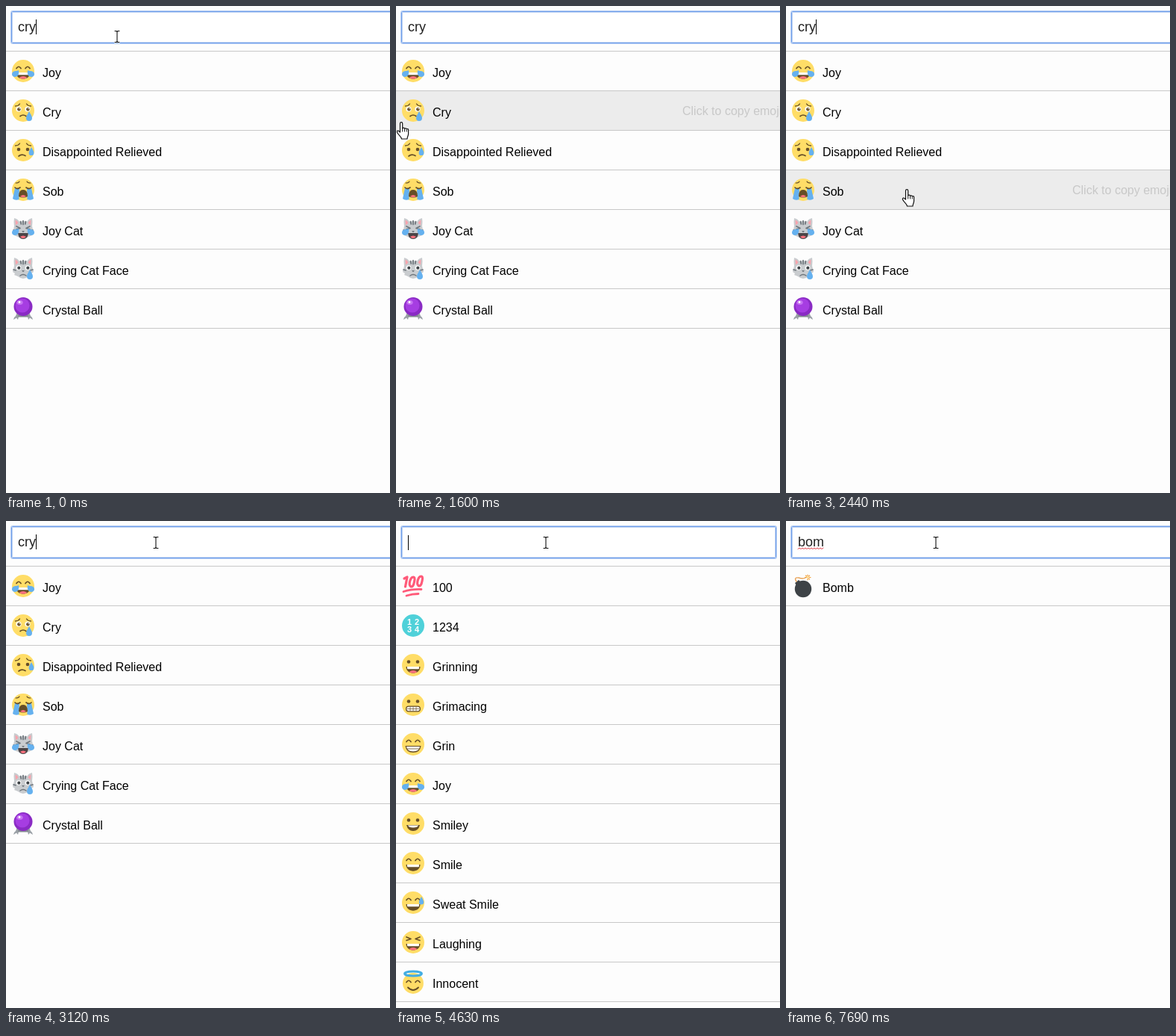
Write an HTML page that moves like this. It is 515x652 px and loops after 8000 ms.

```html
<!DOCTYPE html>
<html lang="en">
<head>
<meta charset="utf-8">
<title>Emoji search</title>
<style>
  html, body { margin: 0; width: 100%; height: 100%; overflow: hidden; background: #fdfdfd; }
  svg { display: block; font-family: Arial, "Liberation Sans", sans-serif; font-size: 16px; }
</style>
</head>
<body>
<svg id="stage" width="515" height="652" viewBox="0 0 515 652"></svg>
<script>
const LOOP = 8000, ROW = 53, TOP = 61;
const YELLOW = '#ffdd67', BROWN = '#664e27', BLUE = '#65b1ef', PINK = '#ff5a79',
      GREY = '#c9cccf', DARK = '#6e757b', RED = '#e2434e';

// Drawing helpers
const fill = (color, d) => `<path fill="${color}" d="${d}"/>`;
const line = (color, width, d) =>
  `<path fill="none" stroke="${color}" stroke-width="${width}" stroke-linecap="round" stroke-linejoin="round" d="${d}"/>`;
const dot = (color, x, y, rx, ry = rx) => `<ellipse fill="${color}" cx="${x}" cy="${y}" rx="${rx}" ry="${ry}"/>`;
const rect = (color, x, y, w, h, r = 0) =>
  `<rect fill="${color}" x="${x}" y="${y}" width="${w}" height="${h}" rx="${r}"/>`;
const text = (s, x, y, attrs = '') => `<text x="${x}" y="${y}" ${attrs}>${s}</text>`;
const at = (x, y, art, more = '') => `<g transform="translate(${x} ${y}) ${more}">${art}</g>`;
const pair = (draw, dx = 12) => draw + at(dx, 0, draw);
const mirror = art => art + at(30, 0, art, 'scale(-1 1)');

// Face parts, on a 30 x 30 tile
const head = dot(YELLOW, 15, 15, 15);
const eyes = pair(dot(BROWN, 9, 10.5, 2.3));
const happyEyes = pair(line(BROWN, 1.7, 'M6 11.5q3-4.5 6 0'));
const tightEyes = mirror(line(BROWN, 1.7, 'M6 8l6 2.5l-6 2'));
const wideEyes = pair(dot('#fff', 9, 13, 3.6) + dot(BROWN, 9.4, 13.2, 2.2) + dot('#fff', 10, 12.5, .7));
const sadBrows = mirror(line(BROWN, 1.3, 'M4.5 9q4 0 6-3'));
const mouth = fill(BROWN, 'M5.5 17h19c0 11.5-19 11.5-19 0z') + fill('#fff', 'M7 17h16v2.2q0 1-1 1h-14q-1 0-1-1z');
const tongue = fill('#ff717f', 'M9.5 24q5.5-4 11 0q-5.5 3.3-11 0z');
const teeth = rect(BROWN, 5, 16.5, 20, 8, 4) + rect('#fff', 6.3, 17.7, 17.4, 5.6, 2.8) +
  line(BROWN, .7, 'M7 20.5h16M11 18v5M15 18v5M19 18v5');
const smileLine = line(BROWN, 1.8, 'M8 18.5q7 7 14 0');
const frown = line(BROWN, 1.7, 'M11 22.5q4-3 8 0');
const drop = fill(BLUE, 'M0 0c2 4 4 6 4 9a4 4 0 0 1-8 0c0-3 2-5 4-9z');
const joyTears = mirror(fill(BLUE, 'M9 14c1 5-1 9-5 9c-4 0-5-4-3-6.500c2-2 5-1 8-2.500z'));

const cat = fill(GREY, 'M3 0q5 1 7 5q5-2 10 0q2-4 7-5q1 5 0 11l2 8l-3 2l1 2l-5 2q-7 6-14 0l-5-2l1-2l-3-2l2-8q-1-6 0-11z') +
  mirror(fill('#f7a4ad', 'M4.500 2.500q3 1 4 4l-3.500 3z')) +
  line(DARK, 1.7, 'M15 3.500v5M11.500 4.500l.8 3.500M18.500 4.500l-.8 3.500M2 16l3 .8M28 16l-3 .8') +
  fill(DARK, 'M13 17h4l-2 2.300z');
const catMouth = fill('#4b4446', 'M8 20h14q-1 8-7 8t-7-8z') + fill('#ff717f', 'M11 25q4-3 8 0q-4 4-8 0z');

const palm = fill('#ffd06b', 'M3 16l1-8q1-2 2 0l.5 6l1-11q1.300-2 2.400 0l-.2 11l2-9q1.500-1 1.800 1l-1.200 12q-1 8-4 8q-6-1-7-10z');
const clapHand = fill('#ffd06b', 'M2 18q-1-3 2-5l11-8q2.500-.5 2 1.500l-5 5l9-6q2.500 0 1.500 2l-7 6l9-4q2 1 0 2.500l-8 5l7-2q2 1 0 2.500q-6 6-11 8q-8 1-10.500-7.500z') +
  line('#e0a33a', 1, 'M12 11.500l-4 3M16 13.500l-4 3M17 17l-4 3');
const zed = (size, x, y) => line('#42ade2', 2.8, `M${x} ${y}l${size} -${size * .3}l-${size * .6} ${size}l${size} -${size * .3}`);

const icons = {
  'Joy': head + happyEyes + mouth + tongue + joyTears,
  'Cry': head + wideEyes + sadBrows + frown + at(23, 16, drop),
  'Disappointed Relieved': head + pair(dot(BROWN, 9, 14, 2.3)) + sadBrows + line(BROWN, 1.7, 'M9 23q4-3.500 9-.5') + at(26, 11, drop, 'scale(.85)'),
  'Sob': head + mirror(line(BROWN, 1.2, 'M5 6q4 0 5-2') + fill(BLUE, 'M4 13h6l-.5 15q-5 2-8.500-1z') + line(BROWN, 1.7, 'M4 12q3 3 7 0')) +
    fill(BROWN, 'M9 24q0-9 6-9t6 9q-6 3-12 0z') + fill('#ff717f', 'M11 24q4-4 8 0q-4 2-8 0z'),
  'Joy Cat': cat + mirror(line(DARK, 1.7, 'M6 11l5 2.500l-5 1.500')) + catMouth + joyTears,
  'Crying Cat Face': cat + pair(dot('#fff', 9, 13.5, 3.3) + dot('#3e4347', 9.3, 13.7, 2.1), 12) +
    line(DARK, 1.5, 'M11 24q4-3 8 0') + at(24, 16, drop),
  'Scream Cat': cat + pair(dot('#fff', 9, 13, 3) + dot('#3e4347', 9, 13, 1.3)) + dot('#4b4446', 15, 23, 3, 4),
  'Scream': head + fill(BLUE, 'M1 11a15 15 0 0 1 28 0z') + pair(dot('#fff', 9, 12, 3.4) + dot(BROWN, 9, 12, 1.4)) + dot(BROWN, 15, 22, 3.5, 5),
  'Crystal Ball': mirror(fill('#9aa0a6', 'M7 20l5 4l-3 2l-1 4l-2-2.500l-4 2.500q0-3 3-5z')) + rect('#848b91', 8, 23, 14, 3.5, 1.5) +
    dot('#8a2bc4', 15, 12.5, 12.5) + dot('#a63de2', 14, 11, 9.5) + dot('#c674f1', 10.5, 7, 4.2, 3) + dot('#fff', 10, 6.5, 1.4),
  'Crown': fill('#ffce31', 'M2 8l7 7l6-11l6 11l7-7l-3 18h-20z') + dot(RED, 15, 20, 2),
  'Crescent Moon': fill('#ffce31', 'M18 1a14 14 0 1 0 11 20a13 13 0 0 1-11-20z'),

  '100': line(PINK, 3.2, 'M3 5l4-2l-2.500 13M13.500 3.500q5-2 3 6q-1.500 8-5 6q-2.500-2-.5-8q1-3 2.500-4zM24 2.500q5-2 3 6q-1.500 8-5 6q-2.500-2-.5-8q1-3 2.500-4z') +
    line(PINK, 2.8, 'M2 22.500q11-3.500 24-3M6 28q8-2.500 16-2.500'),
  '1234': dot('#4fd1d9', 15, 15, 15) +
    [['1', 7, 14], ['2', 17, 14], ['3', 7, 24], ['4', 17, 24]].map(([s, x, y]) => text(s, x, y, 'fill="#fff" font-size="11" font-weight="bold"')).join(''),
  'Grinning': head + eyes + mouth + tongue,
  'Grimacing': head + eyes + teeth,
  'Grin': head + happyEyes + fill(BROWN, 'M4.500 17h21q-1 9-10.500 9t-10.500-9z') + fill('#fff', 'M6 18h18q-1 6.500-9 6.500t-9-6.500z') + line(BROWN, .8, 'M7 21h16'),
  'Smiley': head + eyes + fill(BROWN, 'M6 17h18q-2 8-9 8t-9-8z') + fill('#fff', 'M8 17.500h14q-1 3-7 3t-7-3z'),
  'Smile': head + happyEyes + mouth,
  'Sweat Smile': head + happyEyes + mouth + at(26, 7, drop, 'scale(.8)'),
  'Laughing': head + tightEyes + mouth + tongue,
  'Innocent': at(1, 3, head, 'scale(.93)') + at(0, 4, happyEyes + smileLine) +
    `<ellipse cx="15" cy="4" rx="11.5" ry="3" fill="none" stroke="#42ade2" stroke-width="3"/>`,
  'Wink': head + dot(BROWN, 9, 10.5, 2.3) + line(BROWN, 1.7, 'M18 11.5q3-4 6 0') + smileLine,
  'Blush': head + pair(dot('#ffab6b', 5.5, 16, 3), 19) + happyEyes + smileLine,

  'Money Mouth': head + ['5.5', '17.5'].map(x => text('$', x, 15, `fill="${BROWN}" font-size="12.5" font-weight="bold"`)).join('') +
    fill(BROWN, 'M5 18q10 3 20 0q-2 7-10 7t-10-7z') + rect('#47b04b', 10, 20, 10, 9, 2) + text('$', 12.8, 27.5, 'fill="#d4f0c5" font-size="8"'),
  'Sunglasses': head + fill('#3e4347', 'M0 8h13l2 1l2-1h13v2l-2 1q0 7-6 7t-6-7l-1-1l-1 1q0 7-6 7t-6-7l-2-1z') +
    line('#7e878d', 1.2, 'M5 11l4 3M19 11l4 3') + line(BROWN, 1.8, 'M9 22q8 3 13-2'),
  'Thinking': head + pair(dot('#fff', 10, 11, 2.9) + dot(BROWN, 10.7, 10, 1.8), 11) +
    line(BROWN, 1.4, 'M6.500 6q3-3 6-1M18 4q4-3 7 1M13 19q5-2 8 .5') +
    `<path fill="#fff4d8" stroke="#e8c57b" d="M3 19q1-2 3 0l2 2l8-2q3 1 0 3l-4 1q2 5-3 7q-7 1-7-5z"/>`,
  'Zzz': zed(6, 2, 24) + zed(7, 10, 15) + zed(7.5, 20, 4.5),
  'Smiling Imp': dot('#f05565', 15, 15.5, 14.5) + mirror(fill('#ffd05c', 'M2 0q-3 6 3 11l5-6q-6 0-8-5z') + line('#52333a', 2, 'M5.500 10l6 3') + dot('#52333a', 9.5, 14, 2.2)) +
    line('#52333a', 1.9, 'M6.500 19q8.500 9 17 0'),
  'Robot': line('#42ade2', 1.1, 'M4 13q0-11 10-12M26 13q0-11-10-12') + mirror(rect('#68727a', 1, 12, 4, 9, 1)) +
    dot(RED, 2, 9, 1.8) + dot('#42ade2', 28, 9, 1.8) + fill('#9caf9f', 'M5 9q0-6 10-6t10 6v18q-10 5-20 0z') +
    pair(dot('#dce7dd', 10, 13, 4) + dot('#4b5b52', 10, 13, 2.4), 10) + fill('#4b5b52', 'M13.500 18h3l-1.500-2z') +
    rect('#4b5b52', 8, 20.5, 14, 5, 1.5) + line('#dce7dd', 1.5, 'M10 23h10') + rect('#758b79', 11, 4, 8, 2, 1),
  'Raised Hands': mirror(at(-1, 5, palm) + fill('#42ade2', 'M4 1l4 0l-1 4z')) + fill('#42ade2', 'M13 0h4l-2 5z'),
  'Clap': at(0, 5, clapHand) + fill('#42ade2', 'M15 0l3 5l1-5zM21 1l-1 5l4-3zM25 5l-3 4l5-1z'),
  'Wave': at(4, 4, palm, 'rotate(-22 10 13) scale(1.25 1)') + line('#42ade2', 1.5, 'M22 2q5 2 6 8M22 6q3 1 3 4M1 20q1 6 7 8M4 20q1 3 4 5'),

  'Bomb': dot('#3e4347', 15, 19, 11.2) + fill('#3e4347', 'M4 11l5-4l4 4l-6 5z') +
    line('#e8a45a', 1.4, 'M6 9q-4-6 3-5q6 2 9 0') + line('#f29a2e', 1.1, 'M21 0v2M21 5v2M17.500 3.500h2M23 3.500h2M18.500 1l1 1M23.500 1l-1 1M23.500 6l-1-1') + dot('#ffdd67', 21, 3.5, 1)
};

const split = names => names.split(', ');
const lists = {
  cry: split('Joy, Cry, Disappointed Relieved, Sob, Joy Cat, Crying Cat Face, Crystal Ball'),
  cr: split('Joy, Scream, Cry, Disappointed Relieved, Sob, Joy Cat, Scream Cat, Crying Cat Face, Crown, Crescent Moon, Crystal Ball'),
  c: split('100, Grinning, Grimacing, Grin, Joy, Smiley, Smile, Sweat Smile, Laughing, Innocent, Wink'),
  '': split('100, 1234, Grinning, Grimacing, Grin, Joy, Smiley, Smile, Sweat Smile, Laughing, Innocent'),
  b: split('100, 1234, Blush, Money Mouth, Sunglasses, Thinking, Disappointed Relieved, Sob, Zzz, Smiling Imp, Robot'),
  bo: split('100, 1234, Money Mouth, Sunglasses, Thinking, Zzz, Smiling Imp, Robot, Raised Hands, Clap, Wave'),
  bom: ['Bomb']
};

const beamPath = 'M-3 -7.500h2l1 1l1-1h2M0 -6.500v13M-3 7.500h2l1-1l1 1h2';
const cursors = {
  beam: line('#fff', 2.4, beamPath) + line('#111', 1.1, beamPath),
  arrow: '<path fill="#fff" stroke="#000" d="M.5 .5v16l3.700-3.500l2.300 5.500l2.500-1l-2.300-5.500h5z"/>',
  hand: '<path fill="#fff" stroke="#111" stroke-width="1.2" stroke-linejoin="round" d="M5.500 14V2.300a1.600 1.600 0 0 1 3.200 0V9a1.500 1.500 0 0 1 2.900.4a1.500 1.500 0 0 1 2.700.6a1.300 1.300 0 0 1 2.300 1V16c0 3-1.600 4-1.600 7H7.500c0-3-4.500-5-6-9c-.6-2 1.600-2.600 2.500-1.200z"/>' +
    line('#111', 1, 'M8.700 9v4M11.600 10v3M14.300 11v2')
};

// Each step changes part of the state from its time on
const steps = [
  [0, { query: 'cry', caret: true, hover: -1, cursor: ['beam', 149, 41], typo: false }],
  [550, { caret: false }],
  [950, { caret: true }],
  [1330, { cursor: ['arrow', 125, 55] }],
  [1470, { caret: false, hover: 0, cursor: ['hand', 55, 95] }],
  [1600, { hover: 1, cursor: ['hand', 0, 155] }],
  [1750, { hover: 3, cursor: ['hand', 18, 278] }],
  [1900, { hover: 5, cursor: ['hand', 52, 350] }],
  [2020, { caret: true, hover: 6, cursor: ['hand', 85, 409] }],
  [2170, { cursor: ['hand', 105, 419] }],
  [2300, { hover: 5, cursor: ['hand', 130, 364] }],
  [2440, { hover: 3, cursor: ['hand', 155, 245] }],
  [2570, { caret: false, hover: 1, cursor: ['hand', 178, 140] }],
  [2720, { hover: 0, cursor: ['hand', 192, 72] }],
  [2850, { hover: -1, cursor: ['beam', 205, 29] }],
  [3000, { caret: true, cursor: ['beam', 203, 29] }],
  [3120, { cursor: ['beam', 201, 29] }],
  [3960, { query: 'cr' }],
  [4110, { query: 'c' }],
  [4230, { caret: false }],
  [4380, { query: '' }],
  [4630, { caret: true }],
  [5210, { caret: false }],
  [5340, { query: 'b', caret: true }],
  [5740, { query: 'bo' }],
  [6170, { query: 'bom' }],
  [6730, { caret: false }],
  [7130, { typo: true }],
  [7280, { caret: true }],
  [7690, { caret: false }]
];

const measure = document.createElement('canvas').getContext('2d');
measure.font = '18px Arial, "Liberation Sans", sans-serif';

function inputBox({ query, caret, typo }, right) {
  const ring = (color, inset, r) => `<rect fill="none" stroke="${color}" x="${inset}" y="${inset}" width="${right - 2 * inset}" height="${57 - 2 * inset}" rx="${r}"/>`;
  const end = Math.round(16 + measure.measureText(query).width);
  let art = rect('#fff', 7, 7, right - 14, 43, 2) + ring('#b5cdf4', 6.5, 2) + ring('#71a0ea', 7.5, 1) + ring('#c3d5f3', 8.5, 0);
  art += text(query, 16, 34, 'font-size="18" fill="#222"');
  if (typo) art += line(RED, 1, 'M16 37.500' + 'l2-1.500l2 1.500'.repeat(9).slice(0, -8));
  if (caret) art += rect('#000', end, query ? 18 : 19, 1, 20);
  return art;
}

function row(name, i, hovered) {
  const y = TOP + i * ROW;
  return (hovered ? rect('#ececec', 0, y, 515, 52) + text('Click to copy emoji', 384, y + 32, 'fill="#c8c8c8"') : '') +
    at(8, y + 11, icons[name]) + text(name, 49, y + 34) + rect('#c8c8c8', 0, y + 52, 515, 1);
}

function render(state) {
  const names = lists[state.query];
  const [kind, x, y] = state.cursor;
  // A long list brings in a scrollbar, which narrows the input
  const right = names.length > 10 ? 517 : 534;
  document.getElementById('stage').innerHTML = rect('#fdfdfd', 0, 0, 515, 652) + inputBox(state, right) +
    rect('#c8c8c8', 0, 60, 515, 1) + names.map((name, i) => row(name, i, i === state.hover)).join('') +
    at(x, y, cursors[kind]);
}

let shown = 0;
function frame() {
  const time = performance.now() % LOOP;
  const past = steps.filter(([start]) => start <= time);
  if (past.length !== shown) {
    shown = past.length;
    render(Object.assign({}, ...past.map(([, change]) => change)));
  }
  requestAnimationFrame(frame);
}
frame();
</script>
</body>
</html>
```
